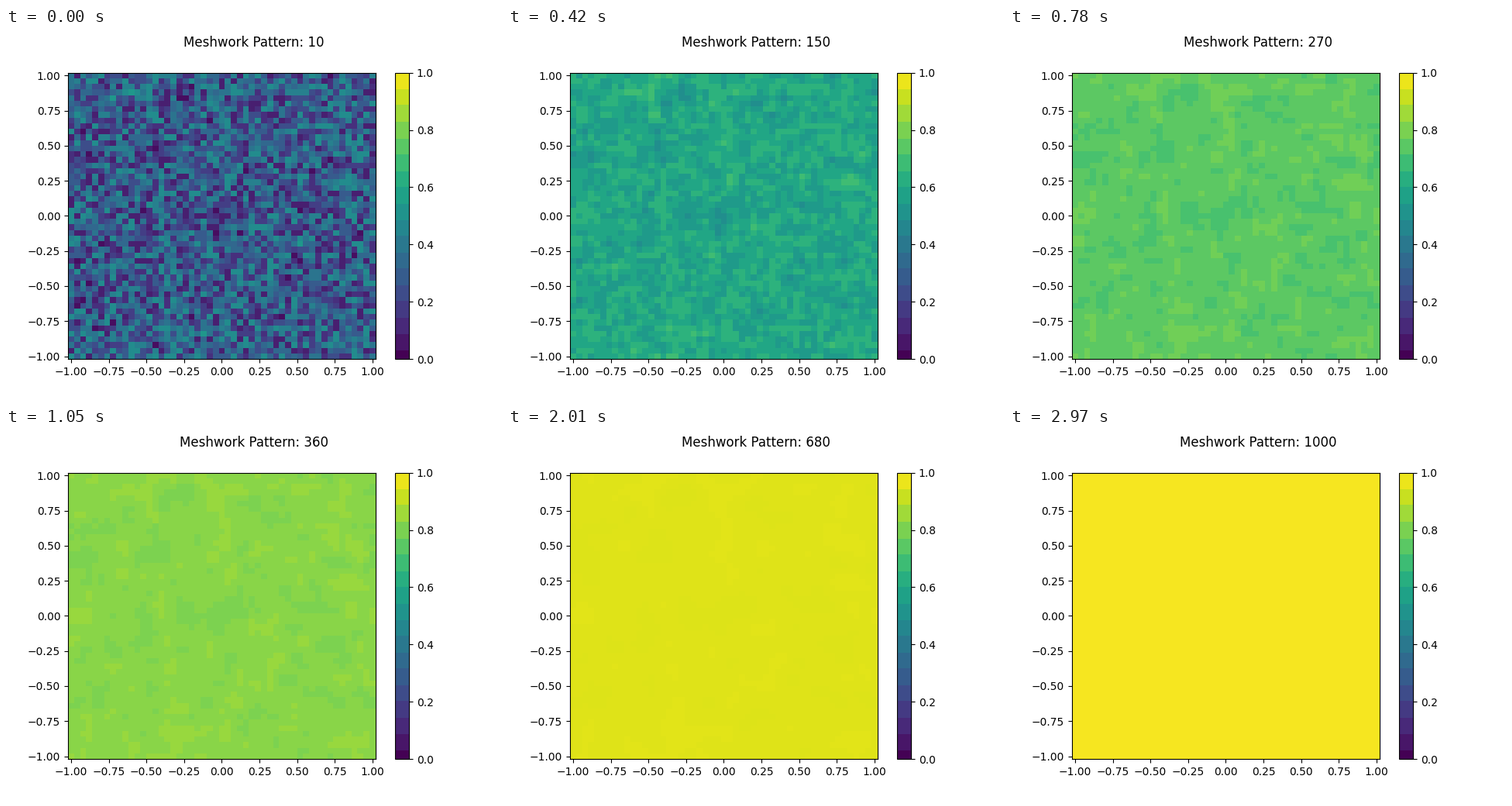
A matplotlib script for the animation above (3000 ms loop, 640 by 480 pixels).

```python
import numpy as np
import matplotlib.pyplot as plt
from matplotlib.animation import FuncAnimation
from matplotlib.cm import ScalarMappable
from matplotlib.colors import ListedColormap

FRAMES, STEPS, SIZE = 100, 10, 51
RATE, DIFFUSION = 0.004, 0.0015
LEVELS = 17.5  # colour bands on the scale; the lowest is half as tall


def laplacian(u):
    return sum(np.roll(u, s, a) for s in (-1, 1) for a in (0, 1)) - 4 * u


def banded(u):
    """Round the field to a few levels around its mean."""
    step = min(0.05, 2.2 * u.std())
    return u.mean() + step * np.round((u - u.mean()) / step)


def simulate():
    """Noise that diffuses while every cell relaxes towards 1."""
    u = np.random.default_rng(4).uniform(0, 0.5, (SIZE, SIZE))
    fields = []
    for _ in range(FRAMES):
        for _ in range(STEPS):
            u = u + RATE * (1 - u) + DIFFUSION * laplacian(u)
        fields.append(np.clip(banded(u), 0, 1))
    return fields


def scale_cmap():
    values = np.linspace(0, 0.999, 256)
    return ListedColormap(plt.get_cmap("viridis")(np.round(values * LEVELS) / LEVELS))


fields = simulate()
axis = np.linspace(-1, 1, SIZE)

fig, ax = plt.subplots(figsize=(6.4, 4.8), dpi=100)
mesh = ax.pcolormesh(axis, axis, fields[0], cmap="viridis", vmin=0, vmax=1,
                     shading="nearest")
fig.colorbar(ScalarMappable(plt.Normalize(0, 1), scale_cmap()), ax=ax)
title = fig.suptitle("")


def update(i):
    mesh.set_array(fields[i])
    title.set_text(f"Meshwork Pattern: {(i + 1) * STEPS}")
    return mesh, title


anim = FuncAnimation(fig, update, frames=FRAMES, interval=30, repeat=True,
                     repeat_delay=0)
plt.show()
```
